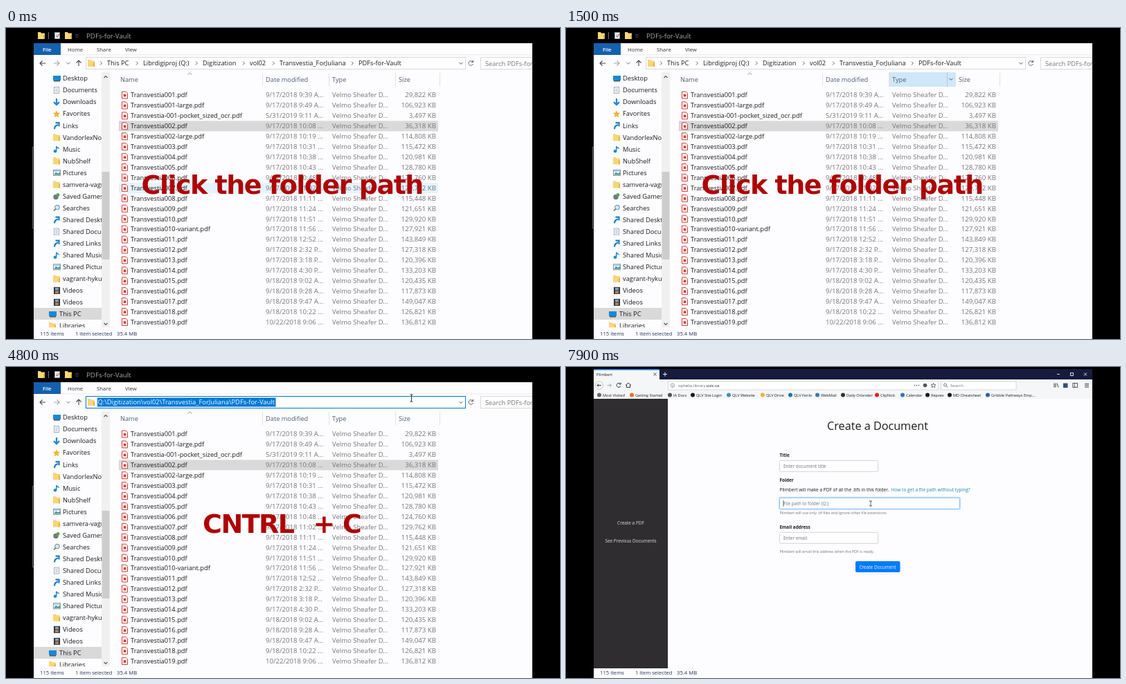
An HTML page that plays this animation: 800x450 px, repeating every 8 s.

```html
<!DOCTYPE html>
<html lang="en">
<head>
<meta charset="utf-8">
<title>Copy a folder path</title>
<style>
  html, body { margin: 0; width: 100%; height: 100%; overflow: hidden; background: #000; }
  svg { display: block; width: 800px; height: 450px; }
  text { font-family: "Open Sans", "Noto Sans", sans-serif; white-space: pre; }
  .caption { font: 700 38px "DejaVu Sans", sans-serif; letter-spacing: -1.5px; }
</style>
</head>
<body>
<svg id="stage" viewBox="0 0 800 450" xmlns="http://www.w3.org/2000/svg"></svg>
<script>
const LOOP = 8000;
const PAPER = '#fdfcfe', INK = '#1c1c1c', BLUE = '#0078d7', FOLDER = '#f7d675';

const rect = (x, y, w, h, fill, extra = '') =>
  `<rect x="${x}" y="${y}" width="${w}" height="${h}" fill="${fill}" ${extra}/>`;
const circle = (x, y, r, fill, extra = '') =>
  `<circle cx="${x}" cy="${y}" r="${r}" fill="${fill}" ${extra}/>`;
const line = (d, color = '#666', width = 1) =>
  `<path d="${d}" fill="none" stroke="${color}" stroke-width="${width}"/>`;
const text = (x, y, size, fill, s, extra = '') =>
  `<text x="${x}" y="${y}" font-size="${size}" fill="${fill}" ${extra}>${s}</text>`;
const group = (id, body, extra = '') => `<g id="${id}" ${extra}>${body}</g>`;
const box = (x, y, w, h, color, extra = '') =>
  rect(x, y, w, h, '#fff', `stroke="${color}" ${extra}`);
const chevron = (x, y, color = '#555') => line(`M${x - 2.5} ${y - 1.2}l2.5 2.5 2.5-2.5`, color);
const iBeam = (x, y, half = 5, width = 1) =>
  line(`M${x - 2} ${y - half}h4M${x} ${y - half}v${2 * half}M${x - 2} ${y + half}h4`, '#333', width);
const folder = (x, y, fill = FOLDER) =>
  `<path d="M${x} ${y - 5}h4l1 1.5h5v8.5h-10z" fill="${fill}"/>` +
  rect(x + 8, y - 1, 2, 6, '#e3b341');
const page = (x, y) => box(x + 1.5, y - 4.5, 7, 9, '#8a9aa8', 'stroke-width=".8"') +
  line(`M${x + 3} ${y - 2}h4M${x + 3} ${y}h4M${x + 3} ${y + 2}h4`, '#6fa0c8', 0.7);

const icons = {
  folder, page,
  desktop: (x, y) => rect(x, y - 4, 11, 7, '#1789d8') + rect(x + 1, y + 3, 9, 1.5, '#555'),
  down: (x, y) => line(`M${x + 5} ${y - 5}v8M${x + 1} ${y}l4 4 4-4`, '#2389d7', 2.2),
  star: (x, y) => `<path d="M${x + 5} ${y - 5}l1.5 3.4 3.7.4-2.8 2.4.9 3.8-3.3-2-3.3 2 .9-3.8-2.8-2.4 3.7-.4z" fill="#eeb432"/>`,
  link: (x, y) => line(`M${x + 2} ${y + 5}q0-5 5-6M${x + 3.5} ${y - 4}h5v5`, '#1e7fc6', 2.2),
  music: (x, y) => circle(x + 3, y + 3, 2.3, '#1e88d8') +
    line(`M${x + 4.7} ${y + 3}v-7q1 2 4 3`, '#1e88d8', 1.5),
  picture: (x, y) => box(x + 0.5, y - 4, 10, 8, '#8796a3') +
    `<path d="M${x + 1} ${y + 3}l3-4 3 2 3-2v4z" fill="#4e9b8b"/>` + rect(x + 1, y - 3.5, 9, 2, '#9cd0f2'),
  game: (x, y) => circle(x + 4, y + 1, 3.7, '#6e7b80') + circle(x + 7, y - 2, 2.4, '#58a44e'),
  search: (x, y) => circle(x + 6, y - 1, 3.2, '#d7ebf8', 'stroke="#8199aa" stroke-width="1.2"') +
    line(`M${x + 1} ${y + 4}l3-3`, '#5c7180', 1.6),
  video: (x, y) => rect(x + 1, y - 5, 9, 10, '#333') + rect(x + 3, y - 4, 5, 3.5, '#7ba7c4') +
    rect(x + 3, y + 0.5, 5, 3.5, '#b0875e')
};

const places = `desktop Desktop|page Documents|down Downloads|star Favorites|link Links
folder VandorlexNook|music Music|folder NubShelf|picture Pictures|folder samvera-vagrant
game Saved Games|search Searches|link Shared Desktop|page Shared Documents|link Shared Links
music Shared Music|picture Shared Pictures|folder vagrant-hyku|video Videos|video Videos
desktop This PC|folder Libraries`.split(/[|\n]/);

const details = `9:39 A 29822|9:49 A 106923|9:11 A 3497|10:08  36318|10:19  114808|10:31  115472
10:38  120981|10:43  128780|10:48  124760|11:02  129762|11:11  115448|11:24  121651
11:51  129920|11:56  127921|12:52  143849|2:32 P 127318|3:18 P 120396|4:30 P 133203
9:02 A 120435|9:28 A 117873|9:47 A 149047|10:22  126821|9:06  136812`.split(/[|\n]/);

const FIRST_ROW = 97, ROW = 14.93;
const rowY = i => FIRST_ROW + i * ROW;

function fileName(i) {
  const special = { 1: '001-large', 2: '-001-pocket_sized_ocr', 4: '002-large', 13: '010-variant' };
  const issue = i < 2 ? 1 : i < 5 ? 2 : i < 13 ? i - 2 : i - 3;
  return `Transvestia${special[i] || String(issue).padStart(3, '0')}.pdf`;
}

function fileDay(i) {
  if (i === 2) return '5/31/2019';
  if (i === 22) return '10/22/2018';
  return i < 18 ? '9/17/2018' : '9/18/2018';
}

function fileRow(info, i) {
  const y = rowY(i), base = y + 3.4;
  const [, time, size] = info.match(/^(.*) (\d+)$/);
  return `<path d="M167.5 ${y - 5}h5.5l2.5 2.5v7.5h-8z" fill="#fff" stroke="#d33a32"/>` +
    rect(169.7, y - 1.2, 3.6, 3.6, '#d33a32') +
    text(180, base, 9.3, INK, fileName(i)) +
    text(375, base, 9.65, '#75757a', `${fileDay(i)} ${time}...`) +
    text(471, base, 9.5, '#75757a', 'Velmo Sheafer D...') +
    text(621, base, 9.7, '#75757a', `${Number(size).toLocaleString('en-US')} KB`, 'text-anchor="end"');
}

function placeRow(entry, i) {
  const [, icon, name] = entry.match(/^(\w+) (.*)$/);
  const y = 73 + i * 17.05, x = i < 20 ? 68 : 62;
  return icons[icon](x, y) + text(i < 20 ? 82 : 77, y + 3.3, 9.3, INK, name);
}

function titleBar() {
  return folder(46, 11) + line('M61.5 6v10', '#777') + page(69, 11) +
    line('M72 11l2 2 3-4', '#d04a3a') + folder(85, 11) +
    line('M100 10h5M100.5 12l2 2 2-2', '#777', 0.8) +
    text(116, 15, 9.7, '#a9a9a9', 'PDFs-for-Vault');
}

function ribbon() {
  const tabs = [['Home', 89], ['Share', 131], ['View', 172]];
  return rect(40, 22, 39, 17, '#1560ad') +
    text(53, 33.5, 7.6, '#fff', 'File', 'font-weight="600"') +
    tabs.map(([name, x]) => text(x, 33.5, 7.8, '#333', name)).join('') +
    line('M79 38.7h681', '#e4e4e8', 0.7) +
    line('M57 51h-8m3.5-3.5l-3.5 3.5 3.5 3.5', '#444', 1.1) +
    line('M69 51h8m-3.5-3.5l3.5 3.5-3.5 3.5', '#aaa', 1.1) + chevron(90, 51, '#777') +
    line('M105 55v-8m-3.5 3.5l3.5-3.5 3.5 3.5', '#444', 1.1) +
    line('M674 49a3.3 3.3 0 1 0 .4 3M674.5 46.5v3h-3', '#666') +
    box(685.5, 42.5, 80, 17, '#d9d9d9') + text(692, 54.5, 9.3, '#777', 'Search PDFs-for-Vault');
}

function breadcrumbs() {
  const crumbs = [['This PC', 146], ['Librdigiproj (Q:)', 198], ['Digitization', 284],
    ['vol02', 352], ['Transvestia_ForJuliana', 395], ['PDFs-for-Vault', 509]];
  return box(115.5, 42.5, 548, 17, '#d9d9d9') + folder(118, 51) +
    crumbs.map(([name, x]) => line(`M${x - 10} 48.5l2.5 2.5-2.5 2.5`, '#666') +
      text(x, 54.3, 9.25, INK, name)).join('') + chevron(657, 51);
}

function addressField() {
  return box(115.5, 42.5, 548, 17, BLUE) + folder(118, 51) + rect(132, 44.5, 257.5, 13, BLUE) +
    text(132.5, 54.4, 9.4, '#fff', 'Q:\\Digitization\\vol02\\Transvestia_ForJuliana\\PDFs-for-Vault') +
    chevron(657, 51);
}

function explorer() {
  const heads = [['Name', 165], ['Date modified', 375], ['Type', 471], ['Size', 567]];
  return line('M40 172.5h-1.5v117h1.5', '#777') +
    rect(40, 22, 720, 428, PAPER) + titleBar() + ribbon() +
    group('crumbs', breadcrumbs()) + group('address', addressField()) +
    group('headHover', rect(466, 64, 96, 21, '#cfe7f6') + line('M550.5 64v21', '#a8cfe6') + chevron(556, 74)) +
    heads.map(([name, x]) => text(x, 78.3, 9.25, '#4c5f78', name)).join('') +
    line('M370.5 65v19M466.5 65v19M562.5 65v19M626.5 65v19', '#e2e2e6') +
    line('M262.5 67.5l3-2.5 3 2.5', '#888', 0.9) +
    rect(163, rowY(3) - 7.4, 461, 15, '#d9d9d9') +
    rect(163, 0, 461, 15, '#e5f3fd', 'id="rowHover"') +
    details.map(fileRow).join('') +
    rect(40, 405, 98, 17, '#d9d9d9') +
    group('places', places.map(placeRow).join(''), 'clip-path="url(#placesClip)"') +
    rect(138, 64, 12, 369, '#f0f0f1') + rect(138.5, 208, 11, 127, '#cdcdcd') +
    line('M141.5 72l2.5-2.5 2.5 2.5M141.5 427l2.5 2.5 2.5-2.5', '#555', 1.2) +
    rect(40, 433.5, 720, 16.5, PAPER) +
    text(49, 445, 7.7, '#22355c', '115 items') + text(100, 445, 7.6, '#22355c', '1 item selected') +
    text(160, 445, 7.7, '#22355c', '35.4 MB') + group('pointer', iBeam(585.5, 45));
}

function bookmarks() {
  const marks = [['Most Visited', 53, '#666'], ['Getting Started', 100, '#e8702a'],
    ['IA Docs', 155, '#555'], ['QLV Site Login', 188, '#1b1b1b'], ['QLV Website', 240, '#4c8cc0'],
    ['QLV Drive', 289, '#e9b530'], ['QLV Fenlo', 329, '#1179bd'], ['WebMail', 368, '#3c78a8'],
    ['Daily Orlander', 405, '#333'], ['ClipNob', 454, '#e02424'], ['Calendar', 491, '#2f74c6'],
    ['Repvex', 527, '#1b1b1b'], ['MD Cheatsheet', 559, '#1b1b1b'],
    ['Gribble Pathways Emp...', 614, '#2f5fa8']];
  return marks.map(([name, x, color]) =>
    circle(x - 5, 40.5, 3, color) + text(x, 42.6, 5.6, INK, name)).join('');
}

function browserChrome() {
  return rect(40, 3, 720, 15, '#161b3d') + rect(40, 4, 95, 14, '#f5f6f7') +
    rect(40, 3, 95, 1.5, '#0a84ff') + text(44, 13, 5.8, INK, 'Plimbert') +
    line('M126.5 8.5l4 4m0-4l-4 4', '#333', 0.9) + line('M140 10.5h6M143 7.5v6', '#eee') +
    line('M709 10.5h4M748 8.5l4 4m0-4l-4 4', '#eee', 0.9) +
    rect(728.5, 8.5, 4, 4, 'none', 'stroke="#eee" stroke-width=".9"') +
    rect(40, 18, 720, 28, '#f5f6f7') +
    circle(48, 26.5, 5.5, '#fff', 'stroke="#aaa" stroke-width=".7"') +
    line('M51 26.5h-6m2.5-2.5l-2.5 2.5 2.5 2.5', '#333') +
    line('M59.5 26.5h6m-2.5-2.5l2.5 2.5-2.5 2.5', '#aaa') +
    line('M78.5 24.5a3 3 0 1 0 .4 3M79 22.5v2.5h-2.5', '#333') +
    line('M86 26.5l4-3.5 4 3.5M87.5 26v3.5h5V26', '#333') +
    box(147.5, 20.5, 390, 12.5, '#ccc', 'stroke-width=".7"') +
    circle(154, 26.7, 2.8, 'none', 'stroke="#777" stroke-width=".7"') + line('M154 26v2.4', '#777', 0.8) +
    text(162, 29, 5.9, '#666', 'ophelia.library.<tspan fill="#111">uvic.ca</tspan>') +
    [503.5, 506.5, 509.5].map(x => circle(x, 26.5, 0.8, '#444')).join('') +
    circle(518.5, 26.5, 2.8, '#555') +
    line('M530.5 23.3l1 2.2 2.4.2-1.8 1.6.6 2.4-2.2-1.3-2.2 1.3.6-2.4-1.8-1.6 2.4-.2z', '#444', 0.8) +
    box(541.5, 20.5, 108.5, 12.5, '#ccc', 'stroke-width=".7"') +
    circle(547.5, 26, 2, 'none', 'stroke="#555" stroke-width=".8"') + line('M549 27.5l2 2', '#555') +
    text(555, 29, 6, '#777', 'Search') +
    line('M705 23.5v6M707 23.5v6M709 23.5l2 6', '#444') + rect(718, 23.5, 6.5, 6.5, '#33507a') +
    rect(732, 23.5, 6.5, 6, 'none', 'stroke="#444" stroke-width=".9"') + line('M734.5 23.5v6', '#444', 0.8) +
    line('M749 24.5h6M749 26.7h6M749 29h6', '#333', 0.9) + bookmarks();
}

function form() {
  const label = (y, s) => text(308.5, y, 6.4, INK, s, 'font-weight="700"');
  const input = (y, w, hint, border = '#ced0d6') =>
    box(308.5, y, w, 16, border, 'rx="2" stroke-width=".9"') + text(314, y + 10.8, 6.45, '#6c737a', hint);
  const note = (y, s) => text(308.5, y, 5.4, '#71767c', s);
  return text(450, 91, 16.2, INK, 'Create a Document', 'text-anchor="middle"') +
    label(129.5, 'Title') + input(135.3, 142, 'Enter document title') +
    label(166, 'Folder') +
    text(308.5, 180, 6.55, INK, 'Plimbert will make a PDF of all the .tifs in this folder.') +
    text(469.5, 180, 6.6, '#2588b8', 'How to get a file path without typing?') +
    rect(307, 187.7, 263, 19, '#c5e0ff', 'rx="3"') +
    input(189.3, 260, 'File path to folder (Q:)', '#80bdff') + line('M314 193v9', '#222', 0.7) +
    note(213.3, 'Plimbert will use only .tif files and ignore other file extensions.') +
    label(233.5, 'Email address') + input(239.3, 142, 'Enter email') +
    note(269, 'Plimbert will email this address when the PDF is ready.') +
    rect(418, 281, 64.5, 16, '#007bff', 'rx="2"') +
    text(450, 291.5, 6.5, '#fff', 'Create Document', 'text-anchor="middle"') +
    iBeam(440, 197.5, 3.5, 0.8);
}

function browser() {
  return rect(38, 0, 722, 437, '#000') + rect(40, 46, 720, 391, PAPER) +
    rect(40, 46, 107, 390, '#2f2d30') + browserChrome() +
    text(93.5, 228, 6.5, '#ddd', 'Create a PDF', 'text-anchor="middle"') +
    text(93.5, 253.7, 6.45, '#ddd', 'See Previous Documents', 'text-anchor="middle"') + form();
}

const caption = (x, s) => `<text class="caption" x="${x}" y="239.5" fill="#ae0303">${s}</text>`;

document.getElementById('stage').innerHTML =
  '<defs><clipPath id="placesClip"><rect x="40" y="64" width="98" height="369.5"/></clipPath></defs>' +
  rect(0, 0, 800, 450, '#000') + explorer() +
  group('clickCaption', caption(195.5, 'Click the folder path')) +
  group('copyCaption', caption(284, 'CNTRL') + caption(443.5, '+') + caption(486, 'C')) +
  group('browser', browser()) + rect(760, 0, 40, 450, '#000');

const part = id => document.getElementById(id);
const show = (id, on) => part(id).setAttribute('visibility', on ? 'visible' : 'hidden');

// The unseen mouse climbs from the list to the address bar.
const mousePath = [[0, 231], [900, 156], [1500, 75], [1800, 48], [LOOP, 48]];
function mouseY(t) {
  const k = mousePath.findIndex(([end]) => t < end);
  const [t0, y0] = mousePath[k - 1], [t1, y1] = mousePath[k];
  return y0 + (y1 - y0) * (t - t0) / (t1 - t0);
}

function draw(t) {
  const y = mouseY(t), row = Math.round((y - FIRST_ROW) / ROW);
  const copying = t >= 2700, browsing = t >= 6200;
  part('rowHover').setAttribute('y', rowY(Math.max(row, 0)) - 7.4);
  show('rowHover', y > 88 && row !== 3);
  show('headHover', y <= 85 && y > 63);
  show('crumbs', !copying);
  show('address', copying);
  show('clickCaption', !copying);
  show('copyCaption', copying && !browsing);
  show('pointer', copying && t < 5400);
  show('browser', browsing);
}

const start = performance.now();
function tick() {
  draw(Math.max(0, performance.now() - start) % LOOP);
  requestAnimationFrame(tick);
}
tick();
</script>
</body>
</html>
```
